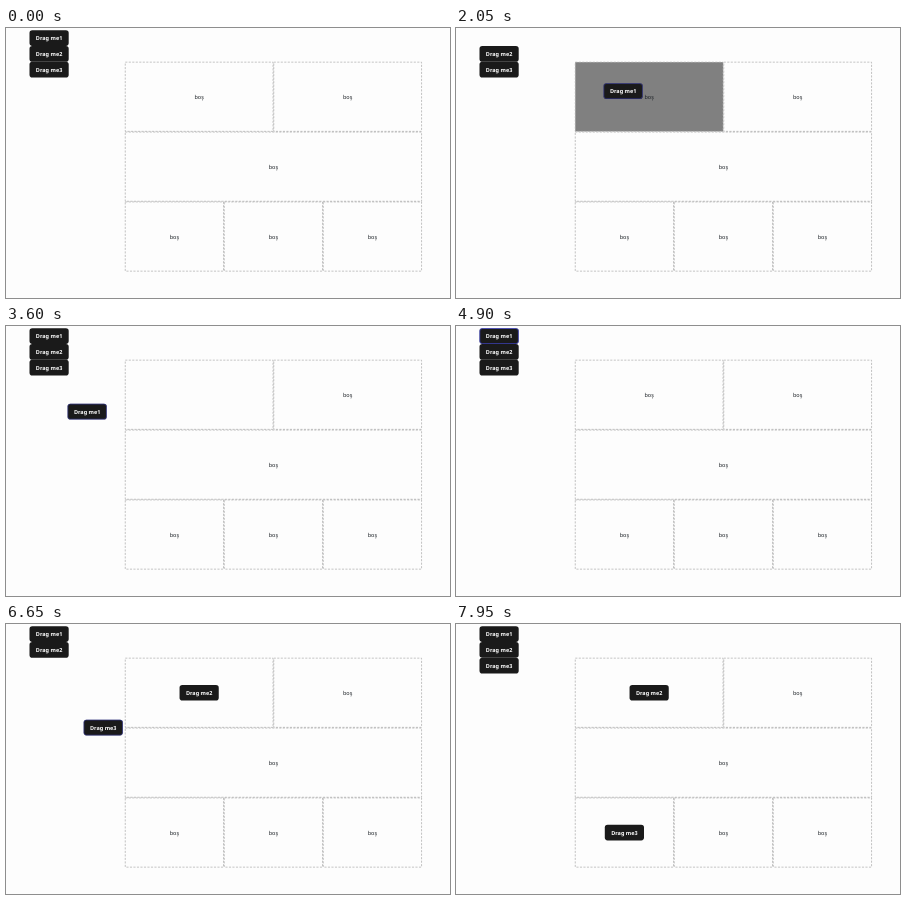
Recreate the animation shown at these times as an HTML page. Size 444 px wide and 270 px high, loop 8000 ms.

```html
<!DOCTYPE html>
<html lang="tr">
<head>
<meta charset="utf-8">
<title>Drag and drop</title>
<style>
  html, body { margin: 0; width: 100%; height: 100%; overflow: hidden; background: #fdfdfd; }
  svg { display: block; width: 444px; height: 270px; }
  text { font: 5.5px "Noto Sans", sans-serif; text-anchor: middle; text-rendering: geometricPrecision; fill: #1c2126; }
  .cell rect { stroke: #aaa; stroke-width: .7; stroke-dasharray: 2.1 1.4; }
  .button text { font-weight: 600; fill: #fff; }
  .button .face { fill: #1a1a1a; }
  .button .ring { fill: none; stroke: #4a4ff0; stroke-width: .6; }
</style>
</head>
<body>
<svg id="stage" viewBox="0 0 444 270"></svg>
<script>
const LOOP = 8000, W = 39.2, H = 15.7, FLIGHT = 250;
const stage = document.getElementById('stage');
const home = [0, 1, 2].map(i => [23.5, 2.2 + 15.8 * i]);

function add(parent, tag, attrs = {}, content = '') {
  const el = document.createElementNS('http://www.w3.org/2000/svg', tag);
  for (const k in attrs) el.setAttribute(k, attrs[k]);
  el.textContent = content;
  return parent.appendChild(el);
}

// Rows of two, one and three drop cells
const cells = [2, 1, 3].flatMap((count, row) =>
  Array.from({ length: count }, (_, i) => {
    const w = 297 / count, h = 69.9, x = 118.9 + i * w, y = 33.8 + row * h;
    const g = add(stage, 'g', { class: 'cell' });
    const box = add(g, 'rect', { x: x + .35, y: y + .35, width: w - .7, height: h - .7 });
    const label = add(g, 'text', { x: x + w / 2, y: y + h / 2 + 2 }, 'boş');
    return { x, y, w, h, box, label };
  }));

function makeButton(name) {
  const g = add(stage, 'g', { class: 'button' });
  add(g, 'rect', { class: 'face', width: W, height: H, rx: 2.8 });
  const ring = add(g, 'rect', { class: 'ring', x: .3, y: .3, width: W - .6, height: H - .6, rx: 2.5 });
  const label = add(g, 'text', { x: W / 2, y: H / 2 + 2 }, name);
  return { g, ring, label };
}

function show(button, visible, [x, y], glow = 0) {
  button.g.style.display = visible ? '' : 'none';
  button.g.setAttribute('transform', `translate(${x} ${y})`);
  button.ring.style.opacity = glow;
}

const slots = [0, 3].map(i => ({ cell: cells[i], button: makeButton('') }));
const side = home.map((_, i) => makeButton('Drag me' + (i + 1)));
const floating = makeButton('');

// Path points are [time, x, y]; a dropped item flies home unless it is discarded
const drags = [
  { item: 0, path: [[1300, ...home[0]], [1400, 43, 9.5], [1500, 68.8, 20.8], [1700, 112, 41], [1900, 140, 53], [2100, 150, 56]] },
  { item: 0, discard: 4050, path: [[3150, 173.5, 60.7], [3350, 138, 66], [3550, 72, 76], [3750, 31, 83], [3900, 34, 83.3]] },
  { item: 1, path: [[5050, ...home[1]], [5200, 52, 25], [5400, 104, 42], [5550, 121.5, 46.5], [5700, 121.5, 46.5]] },
  { item: 2, path: [[6450, ...home[2]], [6600, 62, 76], [6750, 108, 134], [6900, 138, 170.3], [7100, 150, 190], [7250, 152, 196]] },
];
const drops = [
  { slot: 0, item: 0, from: 2100, to: 3150, empty: 4050, hover: [2300, 3300] },
  { slot: 0, item: 1, from: 5700, to: LOOP, empty: LOOP },
  { slot: 1, item: 2, from: 7250, to: LOOP, empty: LOOP },
];
// [item, enter, leave]
const hovers = [
  [2, 450, 600], [1, 500, 670], [0, 830, 1450],
  [2, 4380, 4550], [1, 4450, 4640], [0, 4550, 5060], [1, 4910, 5200], [2, 6070, 6600],
];

const clamp = v => Math.max(0, Math.min(1, v));
const mix = (a, b, p) => a + (b - a) * p;
const glowAt = (t, from, to) => clamp(Math.min((t - from) / 150, (to - t) / 150));

// The CSS "ease" curve
function ease(p) {
  const bez = (a, b, s) => 3 * a * s * (1 - s) ** 2 + 3 * b * s * s * (1 - s) + s ** 3;
  let lo = 0, hi = 1;
  for (let i = 0; i < 20; i++) {
    const mid = (lo + hi) / 2;
    if (bez(.25, .25, mid) < p) lo = mid; else hi = mid;
  }
  return bez(.1, 1, lo);
}

function along(path, t) {
  const i = path.findIndex(k => k[0] > t);
  if (i < 0) return path[path.length - 1].slice(1);
  const [t0, x0, y0] = path[i - 1], [t1, x1, y1] = path[i];
  const p = (t - t0) / (t1 - t0);
  return [mix(x0, x1, p), mix(y0, y1, p)];
}

function overlap(c, [x, y]) {
  const w = Math.min(c.x + c.w, x + W) - Math.max(c.x, x);
  const h = Math.min(c.y + c.h, y + H) - Math.max(c.y, y);
  return w > 0 && h > 0 ? w * h : 0;
}

function draw(t) {
  let away = -1, pos = [0, 0], held = false;
  for (const d of drags) {
    const start = d.path[0][0], end = d.discard || d.path[d.path.length - 1][0];
    if (t >= start && t < end) {
      held = true;
      pos = along(d.path, t);
    } else if (!d.discard && t >= end && t < end + FLIGHT) {
      const p = ease((t - end) / FLIGHT), last = d.path[d.path.length - 1];
      pos = home[d.item].map((h, i) => mix(last[i + 1], h, p));
    } else continue;
    floating.label.textContent = 'Drag me' + (d.item + 1);
    away = d.item;
    if (d.discard) away = 3;
  }
  show(floating, away >= 0, pos, held ? .6 : 0);

  side.forEach((b, i) => {
    const glow = Math.max(0, ...hovers.filter(h => h[0] === i).map(h => glowAt(t, h[1], h[2])));
    show(b, away !== i, home[i], glow);
  });

  const areas = cells.map(c => held ? overlap(c, pos) : 0);
  const best = Math.max(...areas);
  cells.forEach((c, i) => {
    c.box.setAttribute('fill', best > 0 && areas[i] === best ? '#808080' : 'none');
    c.label.style.display = '';
  });

  slots.forEach(({ cell, button }, i) => {
    const drop = drops.find(d => d.slot === i && t >= d.from && t < d.empty);
    if (drop) {
      cell.label.style.display = 'none';
      button.label.textContent = 'Drag me' + (drop.item + 1);
    }
    const glow = drop && drop.hover ? glowAt(t, ...drop.hover) : 0;
    const at = [cell.x + (cell.w - W) / 2, cell.y + (cell.h - H) / 2];
    show(button, !!drop && t < drop.to, at, glow);
  });
}

const begin = performance.now();
function tick() {
  draw((performance.now() - begin) % LOOP);
  requestAnimationFrame(tick);
}
tick();
</script>
</body>
</html>
```
